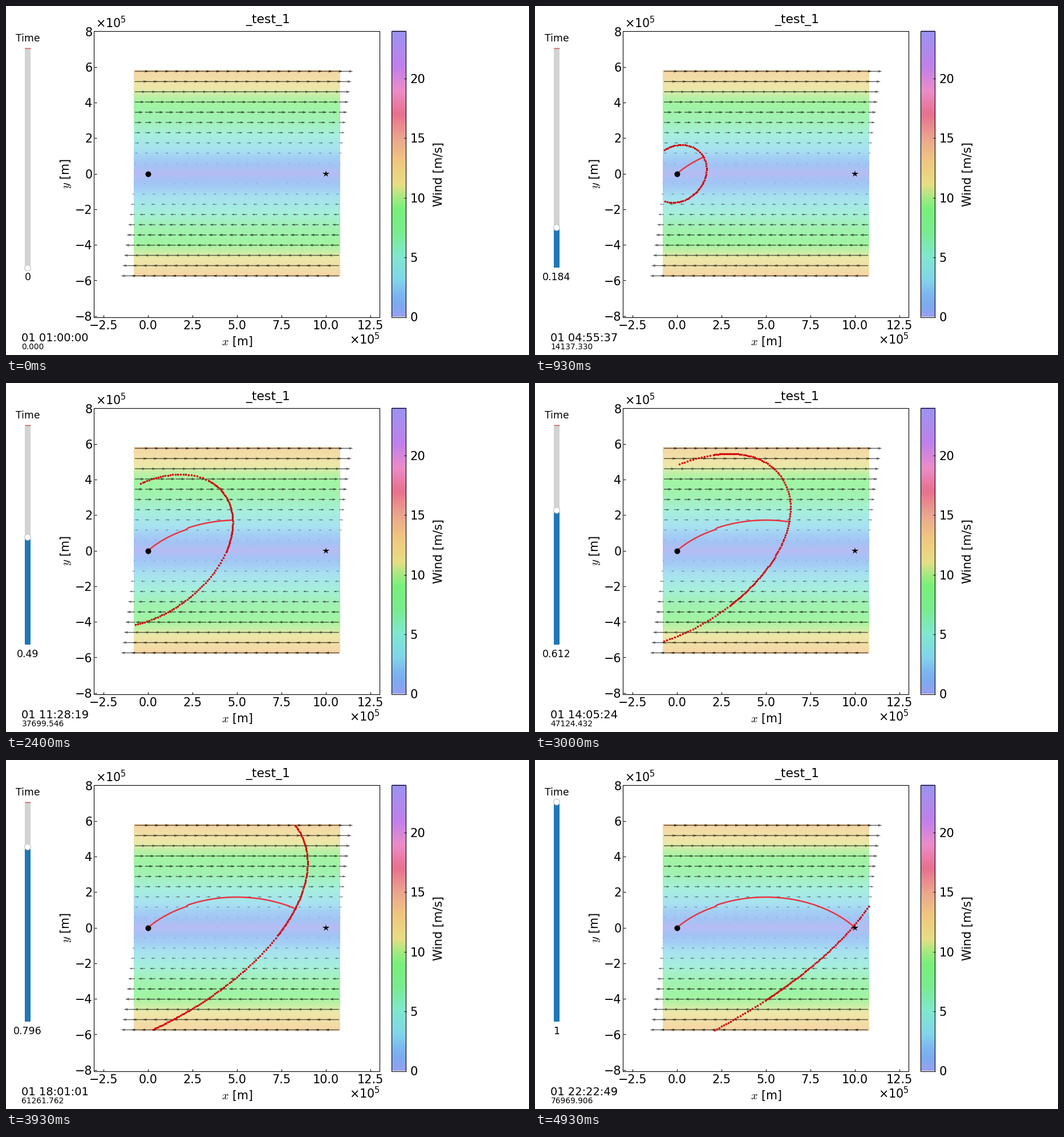
These frames come from a looping animation (917x611 px, 5.06 s). A matplotlib script:

```python
import numpy as np
import matplotlib.pyplot as plt
from matplotlib.animation import FuncAnimation
from matplotlib.colors import LinearSegmentedColormap
from matplotlib.patches import Circle, Rectangle

plt.rcParams["font.family"] = "DejaVu Sans"
plt.rcParams["mathtext.fontset"] = "cm"

W, H, DPI = 917, 611, 64
PT = 72 / DPI                      # points per pixel
LOOP, INTERVAL, STATES = 5060, 20, 50
STARTS = np.array([100 * k + 30 * (k % 2) for k in range(STATES)])

SPEED, SHEAR = 11.6, 2.3e-5        # own speed in m/s, wind gradient in 1/s
TOTAL, STEP = 76969.906, 1000.0    # seconds
SEEDS, MAX_GAP = 2880, 5.5


def to_px(x, y):
    return 249.1 + x * 31.16e-5, 293.5 - y * 31.16e-5


def rates(x, y, heading):
    return np.array([SPEED * np.cos(heading) + SHEAR * y,
                     SPEED * np.sin(heading),
                     -SHEAR * np.cos(heading) ** 2])


def integrate(headings):
    """Fastest-path rays from the start point, as pixels per time step."""
    state = np.array([0 * headings, 0 * headings, headings])
    path = [state]
    for _ in range(int(TOTAL / STEP) + 1):
        half = state + rates(*state) * STEP / 2
        state = state + rates(*half) * STEP
        path.append(state)
    path = np.array(path)
    return to_px(path[:, 0], path[:, 1])


seeds = np.arange(SEEDS) * 2 * np.pi / SEEDS
front_x, front_y = integrate(seeds)
inside = ((front_x > 225.5) & (front_x < 585)
          & (front_y > 114.5) & (front_y < 472.8))
alive = np.logical_and.accumulate(inside, axis=0)

trail_x, trail_y = (p[:, 0] for p in integrate(
    np.array([np.arctan(SHEAR * TOTAL / 2)])))
trail_y = trail_y + np.where(trail_x < 317, 1.2 * (trail_x - 249) / 67, -0.7)

fig = plt.figure(figsize=(W / DPI, H / DPI), dpi=DPI, facecolor="white")
ax = fig.add_axes([0, 0, 1, 1])
ax.set_xlim(0, W)
ax.set_ylim(H, 0)
ax.axis("off")


def label(x, mid, text, size=20.8, ha="center"):
    """Text whose digits are centred on the height mid."""
    return ax.text(x, mid + 0.365 * size, text, fontsize=size * PT, ha=ha,
                   va="baseline", color="black")


def side_label(x, y, text, size):
    ax.text(x, y, text, fontsize=size * PT, rotation=90, ha="center",
            va="center")


def box(x0, y0, x1, y1, **style):
    patch = Rectangle((x0, y0), x1 - x0, y1 - y0, **style)
    ax.add_patch(patch)
    return patch


def gradient(column, x0, y0, x1, y1):
    ax.imshow(column[:, None, :], extent=(x0, x1, y1, y0), aspect="auto",
              interpolation="bilinear", zorder=1)


def number(value, decimals=0):
    return f"{value:.{decimals}f}".replace("-", "\u2212")


WIND_COLORS = [
    (0, (150, 161, 240)), (1, (124, 170, 240)), (2, (125, 186, 240)),
    (3, (130, 212, 235)), (5, (128, 232, 207)), (7, (122, 236, 145)),
    (9, (120, 240, 122)), (10, (165, 233, 130)), (11, (230, 222, 132)),
    (13, (240, 200, 128)), (15, (236, 165, 142)), (17, (232, 112, 142)),
    (19, (236, 140, 200)), (21, (192, 128, 236)), (24, (155, 148, 240))]
wind_map = LinearSegmentedColormap.from_list(
    "wind", [(v / 24, np.array(c) / 255) for v, c in WIND_COLORS], N=512)

# Wind field
height = np.linspace(5.81e5, -5.81e5, 362)
field = wind_map(np.abs(SHEAR * height) / 24)[:, :3]
gradient(0.7 * field + 0.3, 224, 112.5, 586, 474)

grid_x, grid_y = np.meshgrid(226 + 17.9 * np.arange(21),
                             293.4 + 17.9 * np.arange(-10, 11))
flow = (293.4 - grid_y) * 24.5 / 179
ax.quiver(grid_x, grid_y, flow, 0 * flow, units="x", scale_units="x", scale=1,
          width=1.45, minshaft=2, minlength=0.5, color="black", alpha=0.62,
          linewidth=0, zorder=2)

# Plot frame
box(154, 44, 655, 545, fill=False, ec="black", lw=1.1 * PT, zorder=6)
x_ticks, y_ticks = np.arange(-2.5, 13, 2.5), np.arange(-8, 9, 2)
tick_x, tick_y = to_px(x_ticks * 1e5, 0)[0], to_px(0, y_ticks * 1e5)[1]
ax.vlines(tick_x, 540.5, 544.5, color="black", lw=1.1 * PT, zorder=6)
ax.hlines(tick_y, 154.5, 158.5, color="black", lw=1.1 * PT, zorder=6)
for x, value in zip(tick_x, x_ticks):
    label(x, 558, number(value, 1))
for y, value in zip(tick_y, y_ticks):
    label(151.5, y + 0.7, number(value), ha="right")
label(157, 31, r"×$\mathregular{10^5}$", ha="left")
label(655.5, 585, r"×$\mathregular{10^5}$", ha="right")
label(405.5, 587, "$x$ [m]", 20.5)
side_label(105, 294, "$y$ [m]", 20.5)
label(459, 21.5, "_test_1", 22)

# Colour bar
gradient(wind_map(np.linspace(1, 0, 500))[:, :3], 676.5, 43.5, 701.5, 544.5)
box(676, 44, 701, 545, fill=False, ec="black", lw=1.1 * PT, zorder=6)
for value in range(0, 24, 5):
    y = 544.5 - 20.87 * value
    ax.hlines(y, 697.5, 701.5, color="black", lw=1.1 * PT, zorder=6)
    label(708.5, y + 0.3, str(value), 21, "left")
side_label(759, 294.5, "Wind [m/s]", 20.8)

# Slider
box(33, 73, 43, 458, fc="lightgrey", ec="none", zorder=1)
fill = box(33, 458, 43, 458, fc="#1f77b4", ec="none", zorder=2)
ax.hlines(73.5, 33, 43, color="#e8505f", lw=1.3 * PT, zorder=3)
knob = Circle((38, 458), 5.4, fc="white", ec="0.75", lw=1.1 * PT, zorder=4)
ax.add_patch(knob)
label(38, 56, "Time", 17.2)
slider_text = label(38, 473.5, "", 17.4)
clock_text = label(27, 579.5, "", 19.5, "left")
seconds_text = label(27.5, 595.5, "", 13.7, "left")

# Moving parts and end points
trail, = ax.plot([], [], color=(0.92, 0.2, 0.25), lw=2.5 * PT, zorder=3)
front, = ax.plot([], [], "o", color=(0.83, 0, 0.03), ms=3.6 * PT, mew=0,
                 zorder=4)
ax.plot(*to_px(0, 0), "o", color="black", ms=10 * PT, mew=0, zorder=5)
ax.plot(*to_px(1e6, 0), "*", color="black", ms=12.5 * PT, mew=0, zorder=5)


def front_points(step):
    """Rays spaced by powers of two so that no gap exceeds MAX_GAP."""
    x, y = front_x[step], front_y[step]
    gap = np.hypot(x - np.roll(x, -1), y - np.roll(y, -1)) + 1e-6
    level = np.clip(np.floor(np.log2(MAX_GAP / gap)), 0, 6).astype(int)
    keep = alive[step] & (np.arange(SEEDS) % 2 ** level == 0)
    return x[keep], y[keep]


def short(value):
    return next(f"{value:.{d}f}" for d in range(4)
                if abs(value - round(value, d)) < 1e-3)


def update(index):
    now = index * INTERVAL + INTERVAL / 2
    state = int(np.sum(STARTS <= now)) - 1
    share = state / (STATES - 1)
    seconds = TOTAL * share
    step = int(seconds / STEP)
    end = step + (2 if state == STATES - 1 else 1)

    trail.set_data(trail_x[:end], trail_y[:end])
    front.set_data(*front_points(step))
    fill.set_height(-385 * share)
    knob.center = (38, 458.5 - 385 * share)
    slider_text.set_text(short(share))
    clock = int(seconds + 1e-6) + 3600
    clock_text.set_text(
        f"01 {clock // 3600:02d}:{clock // 60 % 60:02d}:{clock % 60:02d}")
    seconds_text.set_text(f"{seconds:.3f}")
    return trail, front, fill, knob, slider_text, clock_text, seconds_text


anim = FuncAnimation(fig, update, frames=LOOP // INTERVAL, interval=INTERVAL,
                     repeat=True, repeat_delay=0, blit=False)
plt.show()
```
